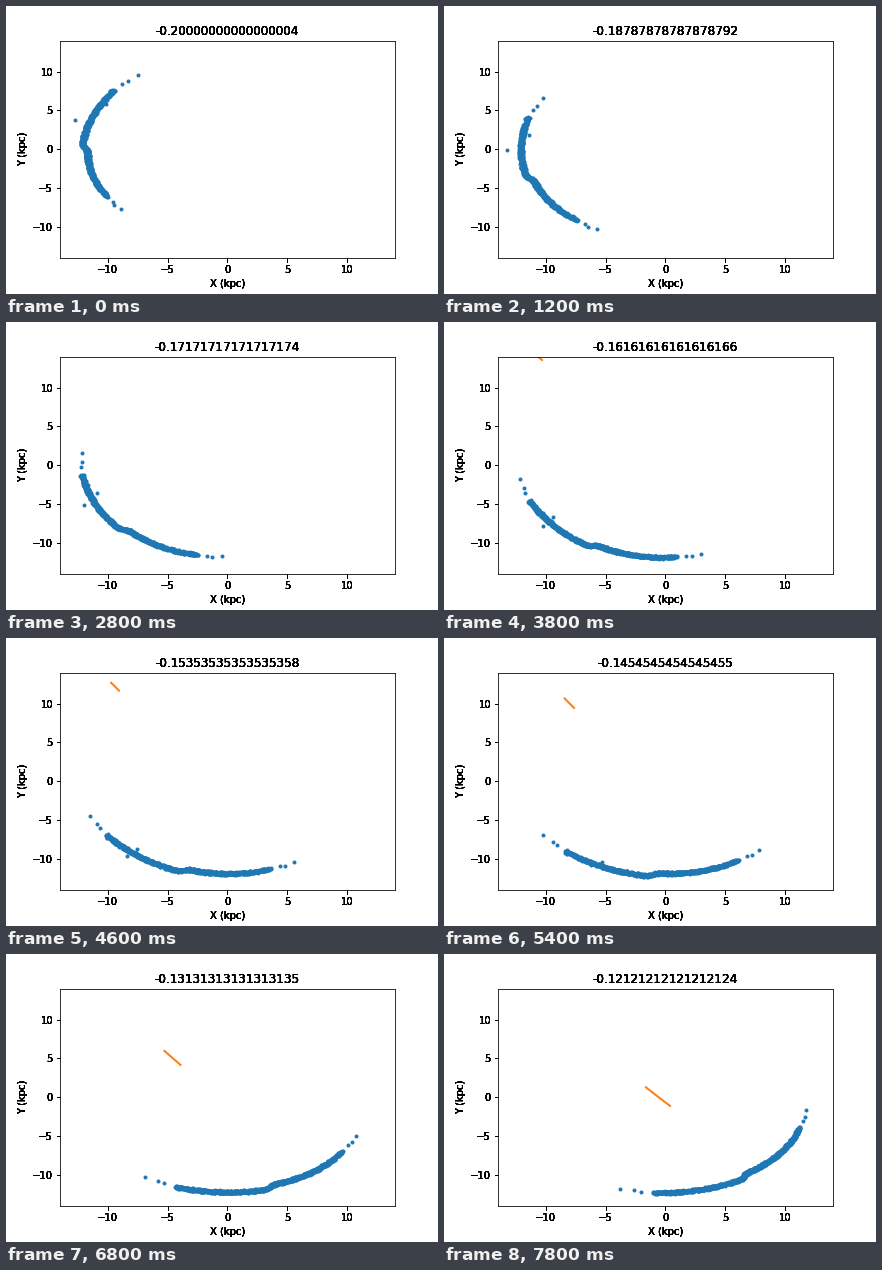
Write a matplotlib script that moves like this. It is 432 px wide and 288 px high and loops after 8 s.

```python
import numpy as np
import matplotlib.pyplot as plt
from matplotlib.animation import FuncAnimation

FRAMES, STEP_MS = 40, 200
LAYERS = 8  # stacked axes give the text its hard, heavy edges

plt.rcParams.update({"font.family": "DejaVu Sans", "font.size": 10})
fig = plt.figure(figsize=(6, 4), dpi=72, facecolor="white")


def make_axes(framed):
    ax = fig.add_axes([0.125, 0.125, 0.775, 0.755])
    ax.patch.set_visible(False)
    ax.spines[:].set_visible(framed)
    ax.set(xlim=(-14, 14), ylim=(-14, 14),
           xticks=range(-10, 11, 5), yticks=range(-10, 11, 5),
           xlabel="X (kpc)", ylabel="Y (kpc)")
    return ax


layers = [make_axes(i == 0) for i in range(LAYERS)]
titles = [ax.set_title("") for ax in layers]
stars, = layers[0].plot([], [], ".", color="C0")
track, = layers[0].plot([], [], color="C1", lw=2)

times = np.nextafter(np.linspace(-0.2, 0, 100), -1)

# Angle offsets from the stream's core in degrees, radial scatter in kpc
rng = np.random.default_rng(4)
TRAIL = np.append(-38 * rng.beta(1, 1.2, 700), [-51, -45.3, -42.7])
LEAD = np.append(32.5 * rng.beta(1, 1.2, 700), [36, 38, 41.8])
SCATTER = np.clip(rng.normal(0, 0.08, TRAIL.size + LEAD.size), -0.17, 0.17)


def stream(k):
    u = np.append(TRAIL, LEAD * (1 + 0.0045 * k))
    # the trailing arm runs outside the leading one, with a step at the core
    r = 11.92 + 0.0045 * k - 0.23 * np.tanh(u / 1.5) + 0.09 * np.sin(np.pi * u / 40)
    r += SCATTER
    # two stars drifting across the stream
    u = np.append(u, [-15.5 - 0.34 * k, -29 + 0.26 * k])
    r = np.append(r, [max(13.3 - 0.0011 * k**2, 12.25), 11.5 + 0.0011 * (k - 14)**2])
    phi = np.radians(179 + 3.18 * k + u)
    return r * np.cos(phi), r * np.sin(phi)


def path(k):
    s = (k - 19) / 20
    x = -10.32 + 6.33 * s - 1.37 * s**2 + 5.75 * s**3
    y = 13.55 - 8.80 * s - 2.22 * s**2 - 3.64 * s**3
    return x, y


def draw(k):
    stars.set_data(*stream(k))
    track.set_data(*path(np.linspace(k - 2.1, k, 12)))
    track.set_visible(k >= 18)
    for title in titles:
        title.set_text(str(float(times[k])))
    return [stars, track, *titles]


anim = FuncAnimation(fig, draw, frames=FRAMES, interval=STEP_MS,
                     repeat=True, repeat_delay=0, blit=False)
plt.show()
```
